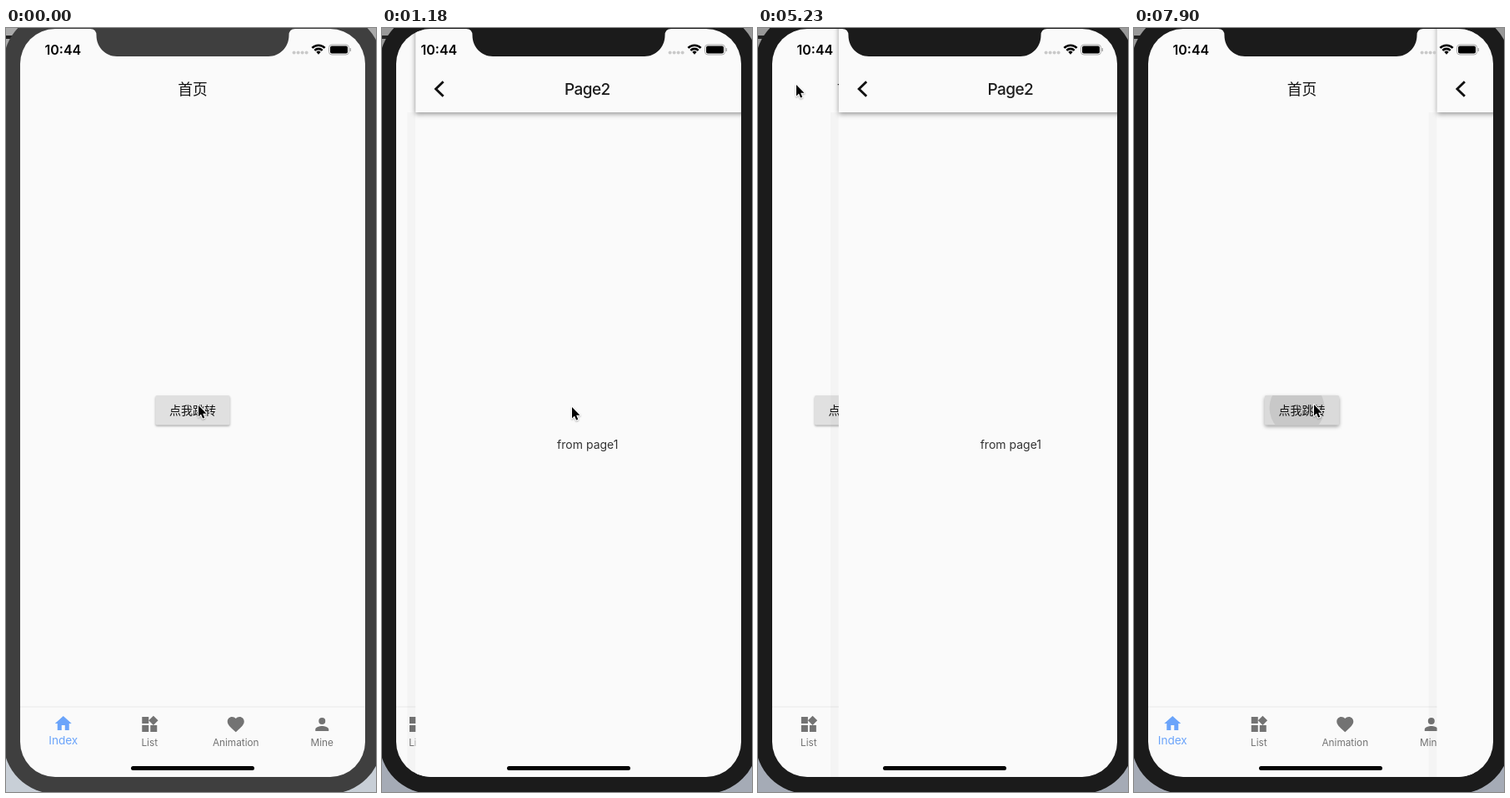
These frames come from a looping animation (444 px wide and 915 px high, 8 s). An HTML page with a canvas:

```html
<!DOCTYPE html>
<html lang="zh">
<head>
<meta charset="utf-8">
<title>Page transition</title>
<style>
  html, body { margin: 0; width: 100%; height: 100%; overflow: hidden; }
  canvas { display: block; width: 444px; height: 915px; }
</style>
</head>
<body>
<canvas id="stage" width="444" height="915"></canvas>
<script>
const ctx = document.getElementById('stage').getContext('2d');
const LOOP = 8000, STEP = 149, PHASE = 15;
const LEFT = 17, RIGHT = 431, TOP = 1, BOTTOM = 897, WIDTH = RIGHT - LEFT;
const CORNER = 42, BEZEL = 20;
const PAPER = '#fafafa', GREY = '#737373', BLUE = '#6ba4fa';
const LATIN = 'Inter, sans-serif';
const CJK = '"Noto Sans CJK SC", "Noto Sans CJK", sans-serif';

const PRESS = 7, PUSH = 7.41, POP = 34.94, PUSH_AGAIN = 52.95, SLIDE_TIME = 1.15;
const MOVES = [
  { start: 0, end: 2, from: [231, 452], to: [228, 454] },
  { start: 29, end: 32, from: [79, 118], to: [46, 68] },
  { start: 36, end: 37, from: [61.5, 89], to: [136, 243] },
  { start: 37, end: 45, from: [136, 243], to: [216, 451] }
];

const ICONS = {
  home: new Path2D('M10 20v-6h4v6h5v-8h3L12 3 2 12h3v8z'),
  list: new Path2D('M13 13v8h8v-8zM3 21h8v-8H3zM3 3v8h8V3zM16.66 1.69L11 7.34 16.66 13l5.66-5.66z'),
  heart: new Path2D('M12 21.35l-1.45-1.32C5.4 15.36 2 12.28 2 8.5 2 5.42 4.42 3 7.5 3c1.74 0 3.41.81 4.5 2.09C13.09 3.81 14.76 3 16.5 3 19.58 3 22 5.42 22 8.5c0 3.78-3.4 6.86-8.55 11.54z'),
  person: new Path2D('M12 12a4 4 0 1 0 0-8 4 4 0 0 0 0 8zm0 2c-2.67 0-8 1.34-8 4v2h16v-2c0-2.66-5.33-4-8-4z')
};
const POINTER = new Path2D('M0 0V13.4L3 10.6 5.1 15.6 7.3 14.7 5.2 9.8H9.5Z');
const NOTCH = new Path2D(
  'M101 0V1Q108.5 1 108.5 9C108.5 23 119.5 34 133 34H315' +
  'C328.5 34 339.5 23 339.5 9Q339.5 1 347 1V0Z');

const clamp = v => Math.min(1, Math.max(0, v));
const easeOut = (u, power) => 1 - (1 - clamp(u)) ** power;
const mix = (a, b, u) => a + (b - a) * u;

function slideAt(step) {
  const since = start => easeOut((step - start) / SLIDE_TIME, 4);
  return since(PUSH) - since(POP) + since(PUSH_AGAIN);
}

function pointerAt(step) {
  const { start, end, from, to } = MOVES.findLast(move => move.start <= step);
  const u = easeOut((step - start) / (end - start), 3);
  return from.map((value, i) => mix(value, to[i], u));
}

function rect(x, y, w, h, color) {
  ctx.fillStyle = color;
  ctx.fillRect(x, y, w, h);
}

function roundRect(x, y, w, h, r, color) {
  ctx.fillStyle = color;
  ctx.beginPath();
  ctx.roundRect(x, y, w, h, r);
  ctx.fill();
}

function circle(x, y, r, color) {
  ctx.fillStyle = color;
  ctx.beginPath();
  ctx.arc(x, y, r, 0, Math.PI * 2);
  ctx.fill();
}

function text(label, x, y, font, color, align = 'center', spacing = 0) {
  ctx.font = font;
  ctx.fillStyle = color;
  ctx.textAlign = align;
  ctx.letterSpacing = spacing + 'px';
  ctx.fillText(label, x, y);
}

function withShadow(alpha, blur, dy, paint) {
  ctx.save();
  ctx.shadowColor = `rgba(0,0,0,${alpha})`;
  ctx.shadowBlur = blur;
  ctx.shadowOffsetY = dy;
  paint();
  ctx.restore();
}

function shifted(dx, dy, paint) {
  ctx.save();
  ctx.translate(dx, dy);
  paint();
  ctx.restore();
}

function clipRound(x, y, w, h, r, paint) {
  ctx.save();
  ctx.beginPath();
  ctx.roundRect(x, y, w, h, r);
  ctx.clip();
  paint();
  ctx.restore();
}

function tab(index, icon, label, active) {
  const x = LEFT + WIDTH * (index + 0.5) / 4;
  const color = active ? BLUE : GREY;
  ctx.fillStyle = color;
  shifted(x - 12, active ? 821 : 822, () => ctx.fill(ICONS[icon]));
  text(label, x, active ? 858 : 859.5, `${active ? 13.6 : 11.8}px ${LATIN}`, color);
}

function button(pressed, ripple) {
  const box = [179.3, 440, 89.4, 35.5, 2];
  withShadow(pressed ? 0.36 : 0.3, pressed ? 4 : 2.5, pressed ? 2 : 1.6, () =>
    roundRect(...box, pressed ? '#dadada' : '#e0e0e0'));
  if (ripple) clipRound(...box, () => circle(218, 455, 33, '#c8c8c8'));
  text('点我跳转', 224, 462.5, `500 14px ${CJK}`, '#111');
}

function homePage(step) {
  const ripple = step > PUSH_AGAIN;
  rect(LEFT, 0, WIDTH, BOTTOM, PAPER);
  text('首页', 224, 79.5, `17.8px ${CJK}`, '#111');
  button(ripple || step >= PRESS && step < POP, ripple);
  rect(LEFT, 812.5, WIDTH, 1, '#e9e9e9');
  tab(0, 'home', 'Index', true);
  tab(1, 'list', 'List');
  tab(2, 'heart', 'Animation');
  tab(3, 'person', 'Mine');
}

function secondPage() {
  rect(LEFT - 10, 101, 10, BOTTOM - 101, 'rgba(0,0,0,0.025)');
  rect(LEFT, 101, WIDTH, BOTTOM - 101, PAPER);
  withShadow(0.42, 6, 2.3, () => rect(LEFT, -10, WIDTH, 111, PAPER));
  ctx.strokeStyle = '#111';
  ctx.lineWidth = 2.9;
  ctx.stroke(new Path2D('M50.3 64.2L41.3 73 50.3 81.8'));
  text('Page2', 223, 79.8, `500 19px ${LATIN}`, '#1c1c1c', 'center', -0.6);
  text('from page1', 223.5, 503.5, `14px ${LATIN}`, '#333');
}

function statusBar() {
  text('10:44', 46.5, 31.6, `600 16px ${LATIN}`, '#000', 'left');
  for (let i = 0; i < 4; i++) circle(345.6 + i * 5, 29.6, 2, '#c9c9c9');

  const from = -Math.PI * 0.75, to = -Math.PI * 0.25;
  ctx.strokeStyle = '#000';
  ctx.lineWidth = 2.6;
  for (const r of [10.8, 6.6]) {
    ctx.beginPath();
    ctx.arc(375, 31.5, r, from, to);
    ctx.stroke();
  }
  ctx.fillStyle = '#000';
  ctx.beginPath();
  ctx.moveTo(375, 31.8);
  ctx.arc(375, 31.5, 3.8, from, to);
  ctx.fill();

  ctx.strokeStyle = '#a8a8a8';
  ctx.lineWidth = 1;
  ctx.beginPath();
  ctx.roundRect(387.5, 20, 24, 12, 3.5);
  ctx.stroke();
  roundRect(389, 21.5, 21, 9, 2, '#000');
  roundRect(412.7, 24, 1.3, 4, 0.6, '#a0a0a0');
}

function device(bright, body) {
  rect(0, 0, 444, 100, bright ? '#aaaaaa' : '#999999');
  rect(0, 9, 30, 4, '#222');
  rect(0, 800, 444, 115, bright ? '#c8cfd7' : '#a5abb6');
  roundRect(LEFT - BEZEL, TOP - BEZEL, WIDTH + 2 * BEZEL, BOTTOM - TOP + 2 * BEZEL,
    CORNER + BEZEL, body);
}

function pointer(x, y) {
  shifted(x, y, () => {
    ctx.lineWidth = 2;
    ctx.lineJoin = 'round';
    ctx.strokeStyle = '#fff';
    withShadow(0.3, 2, 1, () => ctx.stroke(POINTER));
    ctx.fillStyle = '#000';
    ctx.fill(POINTER);
  });
}

function draw(t) {
  const step = Math.floor((t + PHASE) / STEP);
  const slide = slideAt(step);
  const bright = step < PRESS;
  const body = bright ? '#3f3f3f' : '#1b1b1b';
  device(bright, body);
  clipRound(LEFT, TOP, WIDTH, BOTTOM - TOP, CORNER, () => {
    shifted(-slide * WIDTH / 3, 0, () => homePage(step));
    if (slide > 0.001) shifted((1 - slide) * WIDTH, 0, secondPage);
    statusBar();
    roundRect(150, 884, 148, 5, 2.5, '#000');
  });
  ctx.fillStyle = body;
  ctx.fill(NOTCH);
  pointer(...pointerAt(step));
}

function tick() {
  draw(performance.now() % LOOP);
  requestAnimationFrame(tick);
}
tick();
</script>
</body>
</html>
```
